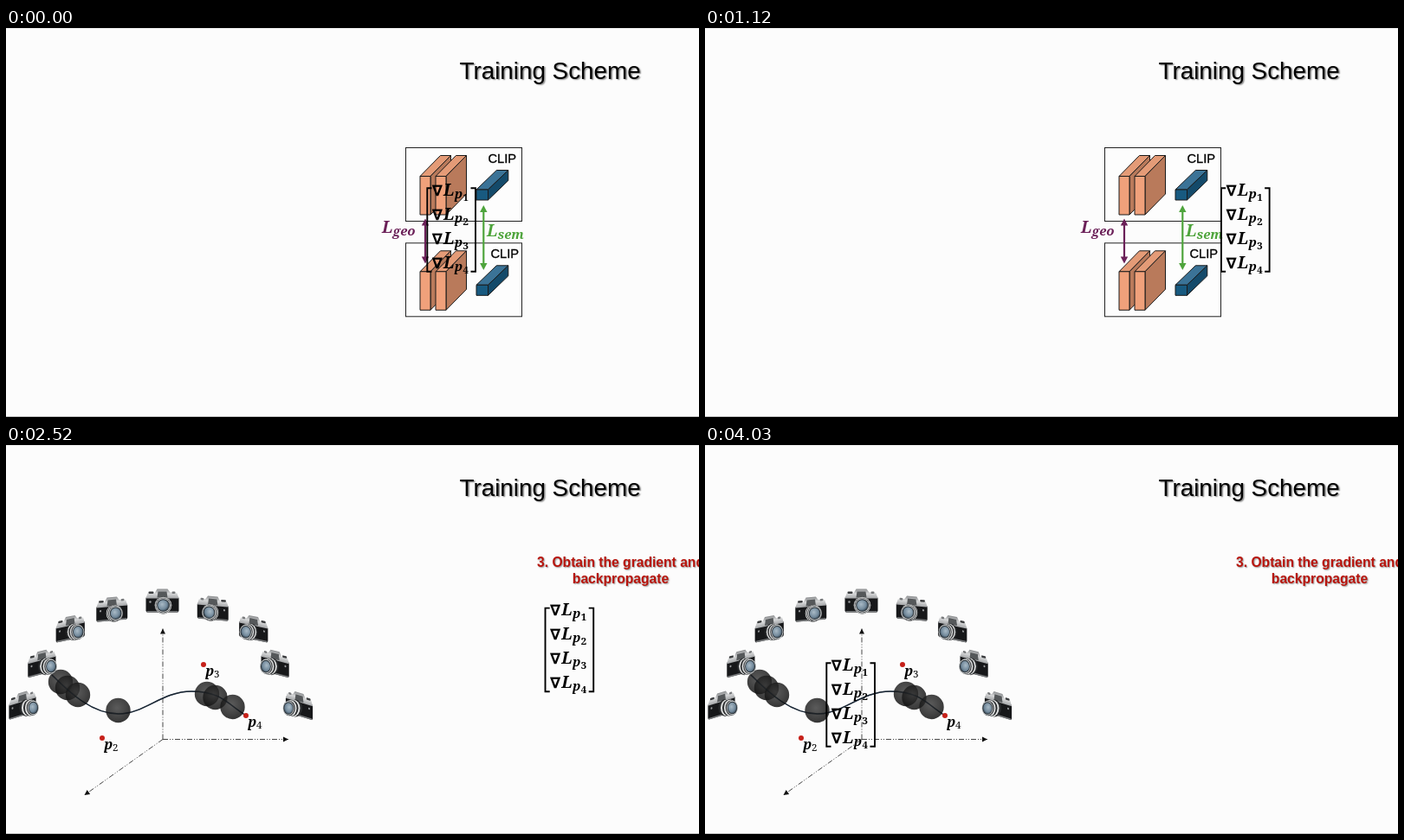
Animation of 800 by 450 pixels, one loop 4.06 s. Source, as an HTML page:

```html
<!DOCTYPE html>
<html lang="en">
<head>
<meta charset="utf-8">
<title>Training Scheme</title>
<style>
  html, body { margin: 0; width: 100%; height: 100%; overflow: hidden; background: #fcfcfc; }
  svg { display: block; width: 800px; height: 450px; }
  text { font-family: "Liberation Sans", Arial, sans-serif; }
  .math { font-family: "Noto Serif", Cambria, serif; font-weight: 700; font-style: italic; }
  .digit { font-family: "Noto Serif", Cambria, serif; }
  .nabla { font-family: "DejaVu Sans", sans-serif; font-weight: 700; }
  .title { font-size: 27.8px; text-shadow: 1.5px 1.5px 1.5px #0007; }
  .note { font-size: 15.65px; font-weight: 700; fill: #b8150d; text-anchor: middle;
          text-shadow: 1px 1px 1.5px #0006; }
  .clip { stroke: #000; stroke-width: .3px; }
  .edge { stroke: #1b1b1b; stroke-width: 1; stroke-linejoin: round; }
  .axis { stroke: #333; stroke-width: .9; stroke-dasharray: 6 2 1 2 1 2; }
</style>
</head>
<body>
<svg viewBox="0 0 800 450">
  <defs>
    <radialGradient id="ball" cx=".45" cy=".4" r=".6">
      <stop offset="0" stop-color="#383838"/>
      <stop offset=".6" stop-color="#1e1e1e"/>
      <stop offset="1" stop-color="#0a0a0a"/>
    </radialGradient>
    <linearGradient id="silver" x2="0" y2="1">
      <stop offset="0" stop-color="#8b8d8f"/>
      <stop offset=".5" stop-color="#d6d7d8"/>
      <stop offset="1" stop-color="#a4a6a8"/>
    </linearGradient>
    <radialGradient id="glass" cx=".4" cy=".4" r=".65">
      <stop offset="0" stop-color="#a9bac6"/>
      <stop offset=".7" stop-color="#71889a"/>
      <stop offset="1" stop-color="#3a4a57"/>
    </radialGradient>
  </defs>
  <rect width="800" height="450" fill="#fcfcfc"/>
  <rect width="800" height="1" fill="#e6e6e6"/>
  <rect y="449" width="800" height="1" fill="#c2c2c2"/>
  <text class="title" x="523.5" y="58.5">Training Scheme</text>
  <g id="losses"></g>
  <g id="world"></g>
  <g id="matrix"></g>
</svg>
<script>
const LOOP = 4060, CUT = 1980;
const el = id => document.getElementById(id);
const losses = el('losses'), world = el('world'), matrix = el('matrix');

const poly = (fill, pts, cls = 'edge') => `<polygon class="${cls}" fill="${fill}" points="${pts}"/>`;
const text = (cls, x, y, size, s, fill = '#000') =>
  `<text class="${cls}" x="${x}" y="${y}" font-size="${size}" fill="${fill}">${s}</text>`;

// Cuboid: front face plus receding top and side
function cuboid(x, y, w, h, dx, dy, [front, top, side]) {
  const r = x + w, b = y + h;
  return poly(top, [x, y, x + dx, y - dy, r + dx, y - dy, r, y]) +
    poly(side, [r, y, r + dx, y - dy, r + dx, b - dy, r, b]) +
    poly(front, [x, y, r, y, r, b, x, b]);
}

function encoder(dy, clipX) {
  const salmon = ['#f0a17b', '#e49b77', '#b97a5b'];
  const blue = ['#185a80', '#3b7397', '#144a6a'];
  return `<g transform="translate(0 ${dy})">
    <rect x="461.5" y="138.5" width="134" height="85" fill="#fdfdfd" stroke="#222"/>` +
    cuboid(478, 171.5, 12, 44.5, 23.5, 24, salmon) +
    cuboid(496, 171.5, 12, 44.5, 23.5, 24, salmon) +
    cuboid(543, 187, 13.5, 12, 23.3, 22.5, blue) +
    text('clip', clipX, 156, 14.7, 'CLIP') + '</g>';
}

function doubleArrow(x, y1, y2, color) {
  const head = (y, d) => poly(color, [x, y, x - 4.2, y + d, x + 4.2, y + d], '');
  return `<path d="M${x} ${y1 + 6}V${y2 - 6}" stroke="${color}" stroke-width="2.2"/>` +
    head(y1, 8) + head(y2, -8);
}

const loss = (x, y, sub, color) =>
  text('math', x, y, 19, 'L', color) + text('math', x + 12.5, y + 3, 15, sub, color);

losses.innerHTML = encoder(0, 556.5) + encoder(110.3, 559.5) +
  doubleArrow(484, 220.5, 272.5, '#6b2058') + doubleArrow(551.3, 205, 280, '#4ea43c') +
  loss(434, 236.5, 'geo', '#6b2058') + loss(555, 240.5, 'sem', '#4ea43c');

// Camera turned by `turn` (0 = facing us); side -1 mirrors it
function camera(x, y, turn, side) {
  const ring = (out, r, fill) =>
    `<ellipse cx="${1 + 9 * turn * out}" cy="${5 - turn}" rx="${r * (1 - .22 * turn)}" ry="${r}" fill="${fill}"/>`;
  return `<g transform="translate(${x} ${y}) scale(${side} 1)">
    <g transform="translate(${-2.5 * turn} 0) skewY(${-17 * turn}) scale(${1 - .18 * turn} 1)">
      <rect x="-19" y="-5" width="38" height="18" rx="2" fill="#17181a"/>
      <path d="M-19-3L-17-9H-9L-6-14H6L9-10L17-9L19-3Z" fill="url(#silver)"/>
      <path d="M-5-11H5L6-4H-6Z" fill="#55585a"/>
      <rect x="-16" y="-11" width="6" height="2.5" rx="1" fill="#3b3d3f"/>
      <rect x="11" y="-11" width="4" height="2.5" rx="1" fill="#77797b"/>
      <rect x="-18" y="11.5" width="36" height="1.8" fill="#77797b"/>
      <circle cx="-14" cy="1" r="1.2" fill="#9a9c9e"/>
    </g>` +
    ring(.1, 10, '#2a2c2e') + ring(.35, 9.8, '#e2e3e3') + ring(.55, 9.6, '#2a2c2e') +
    ring(.75, 9.4, '#dcdddd') + ring(.9, 8.8, '#3a3d40') + ring(1, 8.3, '#c9cccd') +
    ring(1, 7.3, '#2b3238') + ring(1, 6.3, 'url(#glass)') + '</g>';
}

const cameras = [
  [180.5, 180.5, 0, 1], [123, 190, .3, 1], [76, 212, .7, 1], [43.5, 252, .85, 1], [21.5, 300, 1, 1],
  [238, 189, .3, -1], [284, 212, .7, -1], [308.5, 252, .85, -1], [336, 300.5, 1, -1]
];
const balls = [[63, 274], [71, 281], [83, 289], [129.5, 307], [232, 288], [241.5, 292], [261.5, 303]];
const points = [[111, 339, 2], [228, 254, 3], [277, 313, 4]];

const axis = (x, y, angle) =>
  `<path class="axis" d="M181 340.5L${x} ${y}"/>
   <path transform="translate(${x} ${y}) rotate(${angle})" d="M0 0L-6-3V3Z" fill="#111"/>`;

const point = ([x, y, n]) =>
  `<circle cx="${x}" cy="${y}" r="3" fill="#c6211a"/>` +
  text('math', x + 2.5, y + 12.5, 15.5, 'p') + text('digit', x + 12, y + 15, 11.5, n);

const curve = (color, opacity) =>
  `<path d="M53 266C75 288 100 311 130 311S180 285 214 285S255 299 277 313" fill="none"
    stroke="${color}" stroke-width="1.5" opacity="${opacity}"/>`;

world.innerHTML = axis(181, 212.5, -90) + axis(326, 340.5, 0) + axis(90.5, 405, 144.5) +
  curve('#1d2d3f', 1) +
  balls.map(([x, y]) =>
    `<circle cx="${x}" cy="${y}" r="14.2" fill="url(#ball)" opacity=".82"/>`).join('') +
  curve('#101820', .4) +
  cameras.map(c => camera(...c)).join('') + points.map(point).join('') +
  '<text class="note" x="709.5" y="141">3. Obtain the gradient and</text>' +
  '<text class="note" x="709.5" y="160">backpropagate</text>';

const row = n => {
  const y = 10 + 28 * (n - 1);
  return text('nabla', 6.3, y, 17.5, '∇') + text('math', 19.5, y, 19, 'L') +
    text('math', 32.5, y + 3, 14.5, 'p') +
    `<text class="digit" x="42" y="${y + 6}" font-size="11.5" font-weight="700">${n}</text>`;
};

matrix.innerHTML =
  '<path d="M6 1.2H.8V97.8H6M51 1.2H56.5V97.8H51" fill="none" stroke="#000" stroke-width="1.9"/>' +
  [1, 2, 3, 4].map(row).join('');

// Moves: start, duration, from, to
const moves = [
  [87, 1733, [485.5, 184], [648, 184]],
  [2240, 1748, [648, 184], [139.5, 251]]
];
const ease = u => u < .5 ? 2 * u * u : 1 - 2 * (1 - u) ** 2;

function draw(t) {
  const late = t >= CUT;
  losses.style.display = late ? 'none' : '';
  world.style.display = late ? '' : 'none';
  const [start, span, a, b] = moves[+late];
  const k = ease(Math.min(1, Math.max(0, (t - start) / span)));
  const [x, y] = a.map((v, i) => v + (b[i] - v) * k);
  matrix.setAttribute('transform', `translate(${x.toFixed(2)} ${y.toFixed(2)})`);
}

const origin = performance.now();
function tick() {
  draw((performance.now() - origin) % LOOP);
  requestAnimationFrame(tick);
}
draw(0);
requestAnimationFrame(tick);
</script>
</body>
</html>
```
